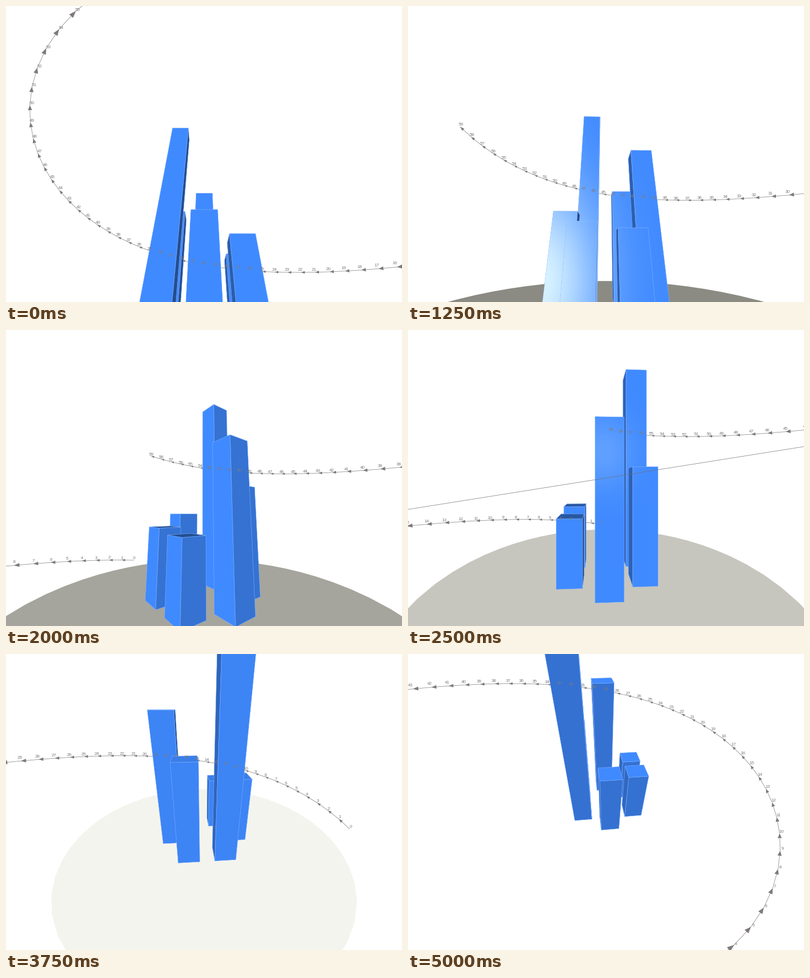
These frames come from a looping animation (720x540 px, 5140 ms). A matplotlib script:

```python
import numpy as np
import matplotlib.pyplot as plt
from matplotlib.animation import FuncAnimation
from matplotlib.collections import LineCollection, PolyCollection
from matplotlib.path import Path

W, H = 720, 540
FOCAL = 344
TICK = 20                 # ms per drawn frame
TICKS = 257
STEP_MS = 5000 / 60       # camera moves once per step
LAST = 60

N = 60                    # numbered points on the helix, radius 1
GROUND = -29.5 / N
DISC_RADIUS = 0.8
NEAR = 0.00134
HALF = 0.0575             # half width of a tower
RING = 0.1965
HEIGHTS = [0.4, 0.335, 0.311, 0.735, 0.543, 1.094]
BLUE = np.array([64, 138, 255]) / 255
GREY = "#7f7979"


def helix(i):
    ang = 2 * np.pi * np.asarray(i, float) / N
    z = (np.asarray(i, float) - 29.5) / N
    return np.stack([np.cos(ang), np.sin(ang), z], axis=-1)


class Camera:
    """Rides the helix, facing the axis with a pitch that follows its height."""

    def __init__(self, c):
        self.c = c
        self.pos = helix(c)
        self.angle = 6 * c
        pitch = np.arctan((c - 29.5) / 30)
        ct, st = self.pos[:2]
        cp, sp = np.cos(pitch), np.sin(pitch)
        self.axes = np.array([[-st, ct, 0],
                              [-ct * sp, -st * sp, cp],
                              [-ct * cp, -st * cp, -sp]])

    def view(self, pts):
        return (np.asarray(pts) - self.pos) @ self.axes.T

    def project(self, pts):
        return to_screen(self.view(pts))


def to_screen(v):
    x = W / 2 + FOCAL * v[..., 0] / v[..., 2]
    y = H / 2 - FOCAL * v[..., 1] / v[..., 2]
    return np.stack([x, y], axis=-1)


def clip_near(p, q):
    """Trim a view-space segment at the near plane."""
    if p[2] < NEAR and q[2] < NEAR:
        return None
    if p[2] < NEAR or q[2] < NEAR:
        cut = p + (q - p) * (NEAR - p[2]) / (q[2] - p[2])
        p, q = (cut, q) if p[2] < NEAR else (p, cut)
    return p, q


def box_faces(k):
    """Yield (normal angle or None for the top, normal, corners)."""
    ang = np.radians(60 * k)
    cx, cy = RING * np.cos(ang), RING * np.sin(ang)
    top = GROUND + HEIGHTS[k]
    base = [(cx + HALF * sx, cy + HALF * sy)
            for sx, sy in ((1, -1), (1, 1), (-1, 1), (-1, -1))]
    for s in range(4):
        (x0, y0), (x1, y1) = base[s], base[(s + 1) % 4]
        a = np.radians(90 * s)
        yield 90 * s, np.array([np.cos(a), np.sin(a), 0]), np.array(
            [(x0, y0, GROUND), (x1, y1, GROUND), (x1, y1, top), (x0, y0, top)])
    yield None, np.array([0, 0, 1]), np.array([(x, y, top) for x, y in base])


def turn(a, b):
    return (a - b + 180) % 360 - 180


def side_shade(delta, c):
    cap = np.interp(c, [30, 38, 50, 59], [1, 0.98, 0.94, 0.82])
    lit = 0.38 + 0.85 * max(0, np.cos(np.radians(delta + 20)))
    return min(cap, max(0.56, lit))


def top_shade(c):
    return np.interp(c, [23.6, 29.5, 38.4, 50, 59], [0.57, 0.64, 0.84, 0.98, 1])


POINTS = helix(np.arange(N))
LABEL_POINTS = POINTS + [0, 0, 0.016]
BOXES = [list(box_faces(k)) for k in range(6)]
rim_angle = np.linspace(0, 2 * np.pi, 45, endpoint=False)
RIM = np.stack([DISC_RADIUS * np.cos(rim_angle), DISC_RADIUS * np.sin(rim_angle),
                np.full(45, GROUND)], axis=-1)
chord = POINTS[1:] - POINTS[:-1]
ARROW_BASE = POINTS[1:] - 0.029 * chord / np.linalg.norm(chord, axis=1)[:, None]
ARROW_RADIUS = 0.0103

fig = plt.figure(figsize=(W / 72, H / 72), dpi=72, facecolor="white")
ax = fig.add_axes([0, 0, 1, 1])
ax.axis("off")

disc = PolyCollection([], zorder=1, edgecolors="none")
far_line = LineCollection([], colors="#8b8686", linewidths=0.8, zorder=2)
near_line = LineCollection([], colors="#6f7076", linewidths=0.7, zorder=30)
arrows = PolyCollection([], facecolors=GREY, edgecolors="none", zorder=3)
towers = [PolyCollection([], edgecolors="#7db0ff", linewidths=0.6,
                         joinstyle="round", zorder=5 + 2 * n) for n in range(6)]
for art in [disc, far_line, near_line, arrows] + towers:
    ax.add_collection(art, autolim=False)
gloss = [ax.imshow(np.ones((54, 72, 4)), extent=(0, W, H, 0), aspect="auto",
                   interpolation="bilinear", zorder=6 + 2 * n) for n in range(6)]
labels = [ax.text(0, 0, str(i), family="Liberation Sans", fontsize=8.1,
                  color="#7f7b7b", ha="center", va="center", zorder=40)
          for i in range(N)]
ax.set_xlim(0, W)
ax.set_ylim(H, 0)

GX, GY = np.meshgrid(np.arange(72) * 10 + 5, np.arange(54) * 10 + 5)


def gloss_map(c, delta):
    """Pale glow with the alpha of a soft highlight."""
    knots = [14.75, 29.5]
    amp = np.interp(c, [5, 14.75, 29.5, 36], [0, 0.95, 0.22, 0])
    amp *= np.exp(-(delta / 8) ** 2)
    if amp < 0.02:
        return None
    x, y = np.interp(c, knots, [235, 357]), np.interp(c, knots, [500, 222])
    sx, sy = np.interp(c, knots, [80, 38]), np.interp(c, knots, [130, 48])
    img = np.ones((54, 72, 4))
    img[..., 0] = 0.92
    img[..., 3] = amp * np.exp(-((GX - x) / sx) ** 2 / 2 - ((GY - y) / sy) ** 2 / 2)
    return img


def draw_disc(cam):
    level = np.interp(cam.c, [5, 14.75, 23.6, 29.5, 38.35, 50, 59],
                      [115, 139, 165, 198, 232, 255, 255])
    tint = np.interp(cam.c, [38, 50, 59], [8, 4, 0])
    disc.set_verts([cam.project(RIM)])
    disc.set_facecolor(np.array([level, level, level - tint]) / 255)


def draw_path(cam):
    v = cam.view(POINTS)
    near, far = [], []
    for p, q in zip(v[:-1], v[1:]):
        seg = clip_near(p, q)
        if seg is not None:
            ends = to_screen(np.array(seg))
            (near if max(p[2], q[2]) < 0.3 else far).append(ends)
    near_line.set_segments(near)
    far_line.set_segments(far)

    heads = []
    for tip, base in zip(v[1:], cam.view(ARROW_BASE)):
        if min(tip[2], base[2]) < 0.1:
            continue
        a, b = to_screen(tip), to_screen(base)
        d = (a - b) / max(np.hypot(*(a - b)), 1e-6)
        side = np.array([-d[1], d[0]]) * ARROW_RADIUS * FOCAL / base[2]
        heads.append([a, b + side, b - side])
    arrows.set_verts(heads)

    for text, p in zip(labels, cam.view(LABEL_POINTS)):
        shown = p[2] > 0.1
        if shown:
            x, y = to_screen(p)
            shown = -8 < x < W + 8 and -8 < y < H + 8
            text.set_position((x, y))
        text.set_visible(bool(shown))


def draw_towers(cam):
    def distance(k):
        a = np.radians(60 * k)
        return np.hypot(RING * np.cos(a) - cam.pos[0], RING * np.sin(a) - cam.pos[1])

    order = sorted(range(6), key=distance, reverse=True)
    for k, tower, glow in zip(order, towers, gloss):
        polys, colors = [], []
        glow.set_visible(False)
        for angle, normal, corners in BOXES[k]:
            if normal @ (cam.pos - corners[0]) <= 0:
                continue
            poly = cam.project(corners)
            polys.append(poly)
            if angle is None:
                colors.append(BLUE * top_shade(cam.c))
                continue
            delta = turn(angle, cam.angle)
            colors.append(BLUE * side_shade(delta, cam.c))
            img = gloss_map(cam.c, delta)
            if img is not None:
                glow.set_data(img)
                glow.set_clip_path(Path(poly), ax.transData)
                glow.set_visible(True)
        tower.set_verts(polys)
        tower.set_facecolor(colors)


def update(tick):
    step = min(LAST, int((tick * TICK + 12) / STEP_MS))
    cam = Camera(step * (N - 1) / LAST)
    draw_disc(cam)
    draw_path(cam)
    draw_towers(cam)
    return []


anim = FuncAnimation(fig, update, frames=TICKS, interval=TICK,
                     init_func=lambda: update(0), repeat=True, repeat_delay=0)
plt.show()
```
